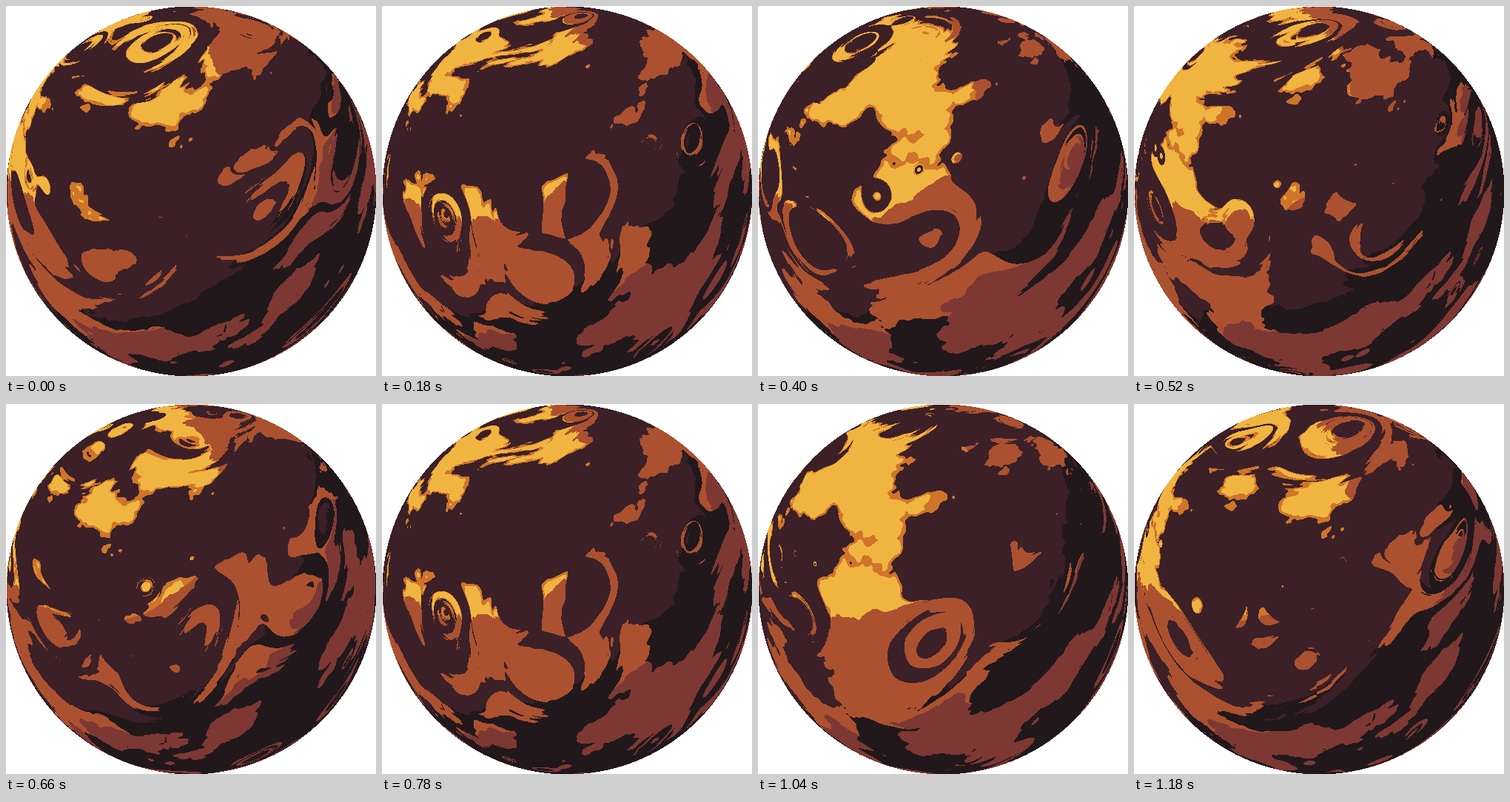
An HTML page with a canvas that plays this animation: 500x500 px, repeating every 1.2 s.

```html
<!DOCTYPE html>
<html lang="en">
<head>
<meta charset="utf-8">
<title>Gas planet</title>
<style>
  html, body { margin: 0; width: 100%; height: 100%; overflow: hidden; background: #fff; }
  canvas { display: block; }
</style>
</head>
<body>
<canvas id="stage" width="500" height="500"></canvas>
<script>
const SIZE = 500, GRID = 9, SEED = 3.07;
const STEP_MS = 20, STEPS = 30, DRIFT = GRID / STEPS;
const COVER = 0.495, LIGHT = 0.25;

const rgba = hex => (0xff000000 | (hex & 255) << 16 | (hex & 0xff00) | hex >> 16) >>> 0;
const YELLOW = rgba(0xf0b541), AMBER = rgba(0xcf752b), ORANGE = rgba(0xab5130),
      RED = rgba(0x7d3833), BROWN = rgba(0x3b2027), BLACK = rgba(0x21181b);

const smooth = t => t * t * (3 - 2 * t);

// Seeded random values on a grid that wraps around the planet.
const lattice = Float64Array.from({ length: GRID * GRID }, (_, i) => {
  const x = i % GRID, y = (i - x) / GRID;
  const v = Math.sin(x * 12.9898 + y * 78.233) * 15.5453 * SEED;
  return v - Math.floor(v);
});

function noise(x, y) {
  const ix = x | 0, iy = y | 0, sx = smooth(x - ix), sy = smooth(y - iy);
  const x0 = ix % GRID, x1 = (x0 + 1) % GRID;
  const y0 = iy % GRID * GRID, y1 = (iy + 1) % GRID * GRID;
  const top = lattice[y0 + x0] + (lattice[y0 + x1] - lattice[y0 + x0]) * sx;
  const low = lattice[y1 + x0] + (lattice[y1 + x1] - lattice[y1 + x0]) * sx;
  return top + (low - top) * sy;
}

// Layers of round storms that bend the noise behind them.
function swirl(x, y, shift) {
  const v = y * GRID * 0.3, row = v | 0, fy = v - row;
  let sum = 0;
  for (let i = 11; i < 20; i++) {
    const n = row + i, u = x * GRID * 0.3 + shift + i + n * 0.31, col = u | 0;
    const r = lattice[n % GRID * GRID + col % GRID];
    const dx = u - col - 0.25 - r / 2, dy = fy - 0.25 - r / 2;
    const d2 = (dx * dx + dy * dy) * 9;
    sum += d2 < r * r ? smooth(Math.sqrt(d2) / r) : 1;
  }
  return sum;
}

function cloudDepth(x, y, shift) {
  const bend = swirl(x, y, shift);
  let cx = x * GRID + bend + shift, cy = y * GRID + bend, sum = 0;
  for (let weight = 0.5; weight > 0.03; weight /= 2) {
    sum += noise(cx, cy) * weight;
    cx *= 2;
    cy *= 2;
  }
  return sum;
}

// Screen pixel to the planet's surface, with bands that sag towards the sides.
function surface(px, py) {
  const cx = px / SIZE * 2 - 1, cy = py / SIZE * 2 - 1;
  const z = Math.sqrt(1 - cx * cx - cy * cy) + 1;
  const x = cx / z / 2 + 0.5;
  const y = cy / z / 2 + 0.5 + smooth(Math.abs(x - 0.4) / 1.3);
  return { x, y };
}

const pixels = [];
for (let py = 0; py < SIZE; py++) {
  for (let px = 0; px < SIZE; px++) {
    if (Math.hypot(px - SIZE / 2, py - SIZE / 2) >= SIZE / 2) continue;
    const dark = Math.hypot(px / SIZE - LIGHT, py / SIZE - LIGHT);
    pixels.push({ at: py * SIZE + px, dark, ...surface(px, py) });
  }
}

function shade(depth, dark) {
  const dim = dark + depth * 0.2;
  if (depth < COVER) return dim > 0.666 ? BLACK : BROWN;
  if (dim > 0.746) return RED;
  if (dim > 0.439) return ORANGE;
  return depth < COVER + 0.03 ? AMBER : YELLOW;
}

const ctx = document.getElementById("stage").getContext("2d");
const views = [];

function render(step) {
  const image = ctx.createImageData(SIZE, SIZE);
  const out = new Uint32Array(image.data.buffer), shift = step * DRIFT;
  for (const { at, x, y, dark } of pixels) out[at] = shade(cloudDepth(x, y, shift), dark);
  return image;
}

const start = performance.now();

function draw() {
  const step = Math.floor((performance.now() - start) / STEP_MS) % STEPS;
  views[step] ||= render(step);
  ctx.putImageData(views[step], 0, 0);
  requestAnimationFrame(draw);
}
draw();
</script>
</body>
</html>
```
